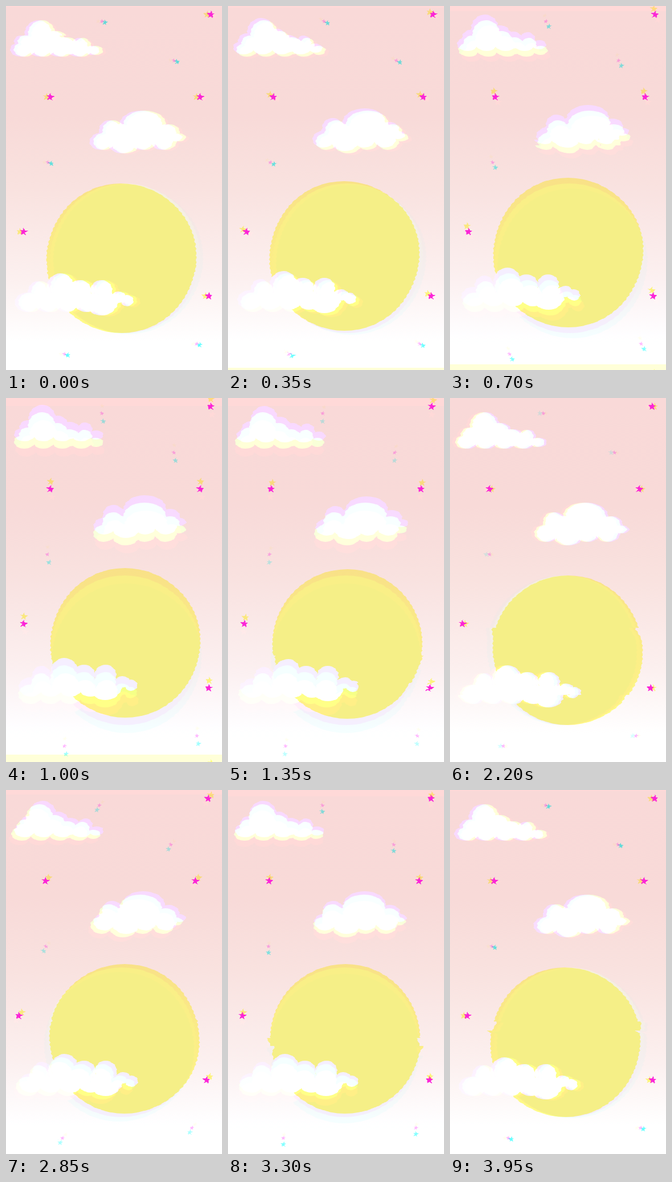
Recreate the animation shown at these times as an HTML page with a canvas. Size 379 by 640 pixels, loop 4 s.

```html
<!DOCTYPE html>
<html lang="en">
<head>
<meta charset="utf-8">
<title>Pastel sky</title>
<style>
  html, body { margin: 0; width: 100%; height: 100%; overflow: hidden; background: #f9dad8; }
  canvas { display: block; width: 379px; height: 640px; }
</style>
</head>
<body>
<canvas id="stage" width="379" height="640"></canvas>
<script>
const W = 379, H = 640, PAD = 40, WIDE = W + PAD * 2;
const LOOP = 4000, STEP = 50, TAU = Math.PI * 2;
const { sin, cos, round, floor } = Math;
const out = document.getElementById('stage').getContext('2d');

const layer = () => {
  const c = document.createElement('canvas');
  c.width = WIDE;
  c.height = H;
  return c.getContext('2d');
};
const scene = layer(), red = layer(), green = layer(), blue = layer(), glow = layer();

// puffs: x, y, rx, ry; a row of equal scallops forms each base
const clouds = [
  {
    puffs: [[36, 66, 15, 14], [61, 50, 24, 25], [88, 62, 19, 18], [110, 70, 18, 15], [136, 69, 13, 13], [156, 78, 12, 8]],
    base: { from: 30, to: 130, y: 77, rx: 18, ry: 12, count: 4 }
  },
  {
    puffs: [[185, 217, 18, 16], [240, 207, 37, 23], [284, 222, 18, 14], [301, 231, 12, 7], [208, 242, 24, 17], [225, 226, 60, 20]],
    base: { from: 170, to: 278, y: 238, rx: 19, ry: 15, count: 4 }
  },
  {
    puffs: [[60, 503, 17, 19], [100, 495, 24, 25], [134, 500, 20, 18], [172, 500, 19, 18], [202, 512, 13, 10], [217, 518, 11, 10], [172, 528, 24, 16]],
    base: { from: 41, to: 180, y: 521, rx: 21, ry: 17, count: 5 }
  }
];
const bigStars = [[357, 15], [74, 160], [337, 160], [27, 397], [354, 510]];
const smallStars = [[166, 27], [292, 96], [72, 275], [331, 594], [99, 612]];

const mod = (v, n) => ((v % n) + n) % n;
const clamp = (v, lo, hi) => Math.min(hi, Math.max(lo, v));

function random(seed) {
  const v = sin(seed * 127.1 + 11.7) * 43758.5453;
  return v - floor(v);
}

function ellipse(x, y, rx, ry) {
  scene.beginPath();
  scene.ellipse(x + PAD, y, rx, ry, 0, 0, TAU);
  scene.fill();
}

function stars(g, list, radius, color) {
  g.fillStyle = color;
  for (const [x, y] of list) {
    g.beginPath();
    for (let i = 0; i < 10; i++) {
      const a = i * TAU / 10 - TAU / 4 + 0.08;
      const r = i % 2 ? radius * 0.42 : radius;
      g.lineTo(x + PAD + cos(a) * r, y + sin(a) * r);
    }
    g.fill();
  }
}

function cloud({ puffs, base }) {
  puffs.forEach(p => ellipse(...p));
  const gap = (base.to - base.from) / (base.count - 1);
  for (let i = 0; i < base.count; i++) ellipse(base.from + i * gap, base.y, base.rx, base.ry);
}

const sky = scene.createLinearGradient(0, 0, 0, H);
[[0, '#f9d9d8'], [0.3, '#f8dad8'], [0.5, '#f9e2df'], [0.75, '#fcf0ef'], [0.92, '#fff']]
  .forEach(([at, color]) => sky.addColorStop(at, color));

stars(glow, bigStars, 7, '#fb26d6');

function drawScene(tint) {
  scene.fillStyle = sky;
  scene.fillRect(0, 0, WIDE, H);
  scene.fillStyle = '#f5ef87';
  ellipse(206, 443.5, 131.5, 131.5);
  scene.fillStyle = '#fff';
  clouds.forEach(cloud);
  stars(scene, bigStars, 7, 'rgb(255,30,125)');
  scene.globalCompositeOperation = 'multiply';
  stars(scene, smallStars, 5.2, `rgb(${tint},255,255)`);
  stars(scene, smallStars, 4.2, 'rgb(255,185,240)');
  scene.globalCompositeOperation = 'source-over';
}

function split(g, color) {
  g.globalCompositeOperation = 'copy';
  g.drawImage(scene.canvas, 0, 0);
  g.globalCompositeOperation = 'multiply';
  g.fillStyle = color;
  g.fillRect(0, 0, WIDE, H);
}

// Slow sway, fine ripple and two short-lived torn slices
function rowShifts(t, a) {
  const rows = Array.from({ length: H }, (_, y) =>
    (4 + 1.5 * cos(TAU * (y - 160) / 230)) * sin(a + TAU / 8) + 0.7 * sin(y * 0.8 + t / 90));
  for (let i = 0; i < 2; i++) {
    const seed = floor(t / 100) * 7 + i * 3;
    const top = floor(random(seed) * H);
    const height = 4 + random(seed + 1) * 20;
    const shift = (random(seed + 2) - 0.5) * 18;
    for (let y = top; y < Math.min(H, top + height); y++) rows[y] += shift * (1 - (y - top) / height);
  }
  return rows;
}

function blit(src, rows, ox = 0, oy = 0, wrap = true) {
  for (let y = 0; y < H; y++) {
    const from = y - round(oy);
    const sy = wrap ? mod(from, H) : clamp(from, 0, H - 1);
    out.drawImage(src.canvas, 0, sy, WIDE, 1, round(rows[sy] + ox) - PAD, y, WIDE, 1);
  }
}

function render(t) {
  const a = TAU * t / LOOP;
  const rows = rowShifts(t, a);

  drawScene(160 - 60 * cos(a));
  split(red, '#f00');
  split(green, '#0f0');
  split(blue, '#00f');

  out.fillStyle = '#000';
  out.fillRect(0, 0, W, H);
  out.globalCompositeOperation = 'lighter';
  blit(green, rows);
  blit(red, rows, 6 * cos(a - 0.47), 7 - 6 * cos(2 * a - 0.52) + 2 * sin(a));
  blit(blue, rows,
    0.5 - 5 * cos(a) - 2 * cos(2 * a) - 2 * sin(a),
    -5 + 5 * cos(2 * a - 0.17) - 3 * sin(a),
    cos(a - 0.4) > 0.3);
  out.globalCompositeOperation = 'source-over';
  blit(glow, rows);
}

let last = -1;
const start = performance.now();
function tick() {
  const t = floor(mod(performance.now() - start, LOOP) / STEP) * STEP;
  if (t !== last) render(last = t);
  requestAnimationFrame(tick);
}
tick();
</script>
</body>
</html>
```
